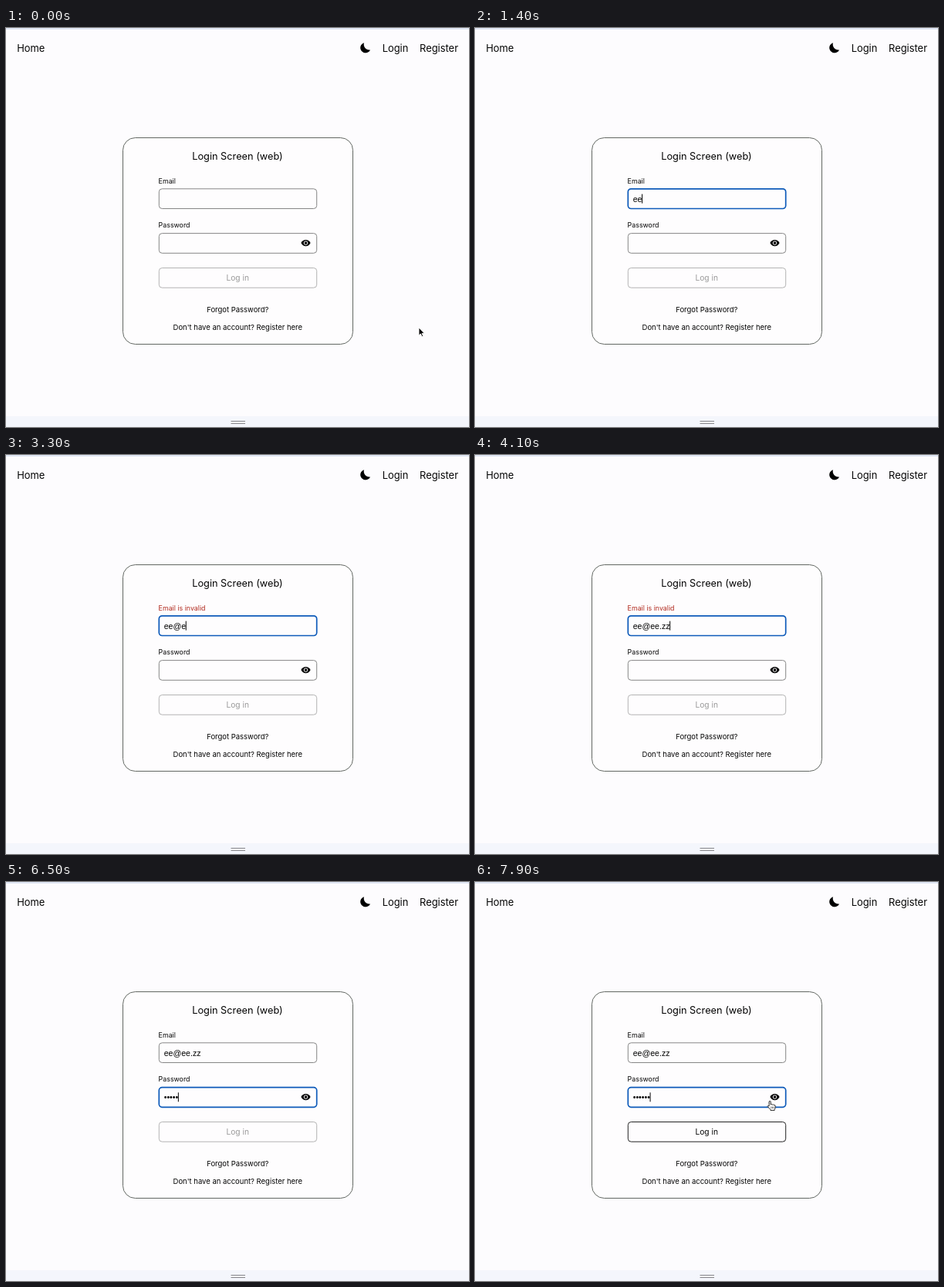
Recreate the animation shown at these times as an HTML page. Size 600 by 518 pixels, loop 8 s.

```html
<!DOCTYPE html>
<html lang="en">
<head>
<meta charset="utf-8">
<title>Login form</title>
<style>
  html, body { margin: 0; width: 100%; height: 100%; overflow: hidden; background: #fdfcfe; }
  svg { display: block; width: 600px; height: 518px; }
  text { font-family: Inter, sans-serif; fill: #050505; white-space: pre; }
  .nav { font-size: 12.9px; }
  .title { font-size: 12.75px; }
  .label { font-size: 8.85px; }
  .link { font-size: 9.48px; }
  .value { font: 10.6px "Liberation Sans", Arial, sans-serif; }
  .mid { text-anchor: middle; }
  .box { fill: #fefdfe; stroke: #868686; stroke-width: 1; }
  .box.focus { stroke: #0d5ab9; stroke-width: 1.7; }
  #button rect { stroke: #b3b3b3; }
  #button text { font-size: 10.2px; fill: #999; }
  #button.on rect { stroke: #222; }
  #button.on text { fill: #050505; }
</style>
</head>
<body>
<svg viewBox="0 0 600 518">
  <rect width="600" height="2" fill="#e0e6f4"/>
  <rect y="504" width="600" height="14" fill="#f4f6fc"/>
  <path d="M291.5 510.5h18.5M291.5 513.5h18.5" stroke="#858589"/>

  <text class="nav" x="14.2" y="30.6">Home</text>
  <path d="M464 19.2A6.7 6.7 0 1 0 472 28.4A7.2 7.2 0 0 1 464 19.2Z"/>
  <text class="nav" x="487.7" y="30.6">Login</text>
  <text class="nav" x="586" y="30.6" text-anchor="end">Register</text>

  <rect x="151.5" y="142.5" width="298" height="268" rx="16" fill="#fefdfe" stroke="#626762"/>
  <text class="title mid" x="300" y="171">Login Screen (web)</text>

  <text class="label" id="emailLabel" x="197.6" y="201.8">Email</text>
  <rect class="box" id="emailBox" x="198.3" y="208.8" width="204.4" height="25.7" rx="4"/>
  <text class="value" id="email" x="204.7" y="225.5"></text>

  <text class="label" x="197.6" y="259.4">Password</text>
  <rect class="box" id="passBox" x="198.3" y="266.6" width="204.4" height="25.7" rx="4"/>
  <text class="value" id="pass" x="204.7" y="283"></text>
  <path d="M382.4 279.1C384.8 273.5 392.2 273.5 394.6 279.1C392.2 284.7 384.8 284.7 382.4 279.1Z"/>
  <circle cx="388.5" cy="279.1" r="2.3" stroke="#fefdfe" stroke-width="1"/>

  <g id="button">
    <rect class="box" x="198.3" y="311.5" width="204.4" height="25.7" rx="4"/>
    <text class="mid" x="300.2" y="328.2">Log in</text>
  </g>
  <text class="link mid" x="300.3" y="368.9">Forgot Password?</text>
  <text class="link mid" x="300.3" y="392.1">Don't have an account? Register here</text>

  <rect id="caret" width="1" height="12"/>
  <g id="cursor">
    <path id="arrow" d="M0 0V10.2L2.4 8L3.9 11.8L5.6 11.1L4.1 7.4H7.2Z" stroke="#fff" stroke-width=".9"/>
    <g id="beam" fill="none">
      <path d="M-2.6 -5.7Q0 -5.7 0 -4V4Q0 5.7 -2.6 5.7M2.6 -5.7Q0 -5.7 0 -4M2.6 5.7Q0 5.7 0 4M-1.5 2H1.5" stroke="#fff" stroke-width="2.2"/>
      <path d="M-2.6 -5.7Q0 -5.7 0 -4V4Q0 5.7 -2.6 5.7M2.6 -5.7Q0 -5.7 0 -4M2.6 5.7Q0 5.7 0 4M-1.5 2H1.5" stroke="#111"/>
    </g>
    <g id="hand" stroke="#111" stroke-width=".9" stroke-linejoin="round">
      <path fill="#fff" d="M-1.4 6V0Q-.4 -1.6 .7 0V4Q1.7 2.7 2.8 4.2Q3.8 3.2 4.8 4.6Q6.6 4 6.7 6V8Q6.5 9.4 5.7 10.2V11.4H.4V10.4L-3.4 6.4Q-3.4 4.8 -1.4 6Z"/>
      <path d="M1.3 6.6V9M3 6.6V9M4.7 6.6V9" stroke-width=".6"/>
    </g>
  </g>
</svg>
<script>
const LOOP = 8000, STEP = 100;
const ADDRESS = 'ee@ee.zz';
const emailKeys = [1200, 1400, 1900, 3300, 3400, 3500, 3700, 4000];
const passKeys = [5100, 5200, 6000, 6200, 6500, 6900];
const focusEmail = 1000, focusPass = 4500;
const resets = [focusEmail, ...emailKeys, focusPass, ...passKeys];
// cursor positions, one per step
const approach = [[535, 389], [531, 386], [511, 373], [470, 347], [415, 312],
  [354, 272], [304, 242], [275, 226], [267, 222], [269, 222]];
const leave = [[270, 219], [290, 220], [325, 233], [362, 252], [390, 264],
  [399, 272], [391, 281], [382.5, 285]];

const $ = id => document.getElementById(id);
const typed = (keys, t) => keys.filter(k => k <= t).length;
const show = (el, on) => el.setAttribute('visibility', on ? 'visible' : 'hidden');

function cursorAt(t) {
  if (t < emailKeys[0]) return approach[Math.min(t / STEP, approach.length - 1)];
  return t >= 7200 ? leave[(t - 7200) / STEP] : null;
}

function cursorShape(x, y) {
  const inRow = x > 198 && x < 403;
  const overPass = inRow && y > 266 && y < 293;
  if (overPass && x > 378) return 'hand';
  return overPass || inRow && y > 208 && y < 235 ? 'beam' : 'arrow';
}

function drawCursor(t) {
  const pos = cursorAt(t);
  const shape = pos && cursorShape(...pos);
  for (const id of ['arrow', 'beam', 'hand']) show($(id), id === shape);
  if (pos) $('cursor').setAttribute('transform', `translate(${pos})`);
}

function drawLabel(t) {
  const invalid = t >= 3000 && t < 5100;
  const changing = t === 3000 || t === 5100;
  $('emailLabel').textContent = invalid ? 'Email is invalid' : 'Email';
  $('emailLabel').style.fill = changing ? '#64180f' : invalid ? '#b0281c' : '#050505';
}

function drawCaret(t) {
  const last = resets.filter(k => k <= t).pop();
  const inPass = t >= focusPass;
  const field = $(inPass ? 'pass' : 'email');
  show($('caret'), last !== undefined && Math.floor((t - last) / 500) % 2 === 0);
  $('caret').setAttribute('x', 204.3 + field.getComputedTextLength());
  $('caret').setAttribute('y', inPass ? 273.3 : 215.6);
}

function draw(t) {
  const dots = typed(passKeys, t);
  $('email').textContent = ADDRESS.slice(0, typed(emailKeys, t));
  $('pass').textContent = '•'.repeat(dots);
  $('emailBox').classList.toggle('focus', t >= focusEmail && t < focusPass);
  $('passBox').classList.toggle('focus', t >= focusPass);
  $('button').classList.toggle('on', dots === passKeys.length);
  drawLabel(t);
  drawCaret(t);
  drawCursor(t);
}

function tick() {
  const t = performance.now() % LOOP;
  draw(Math.floor(t / STEP) * STEP);
  requestAnimationFrame(tick);
}
tick();
</script>
</body>
</html>
```
